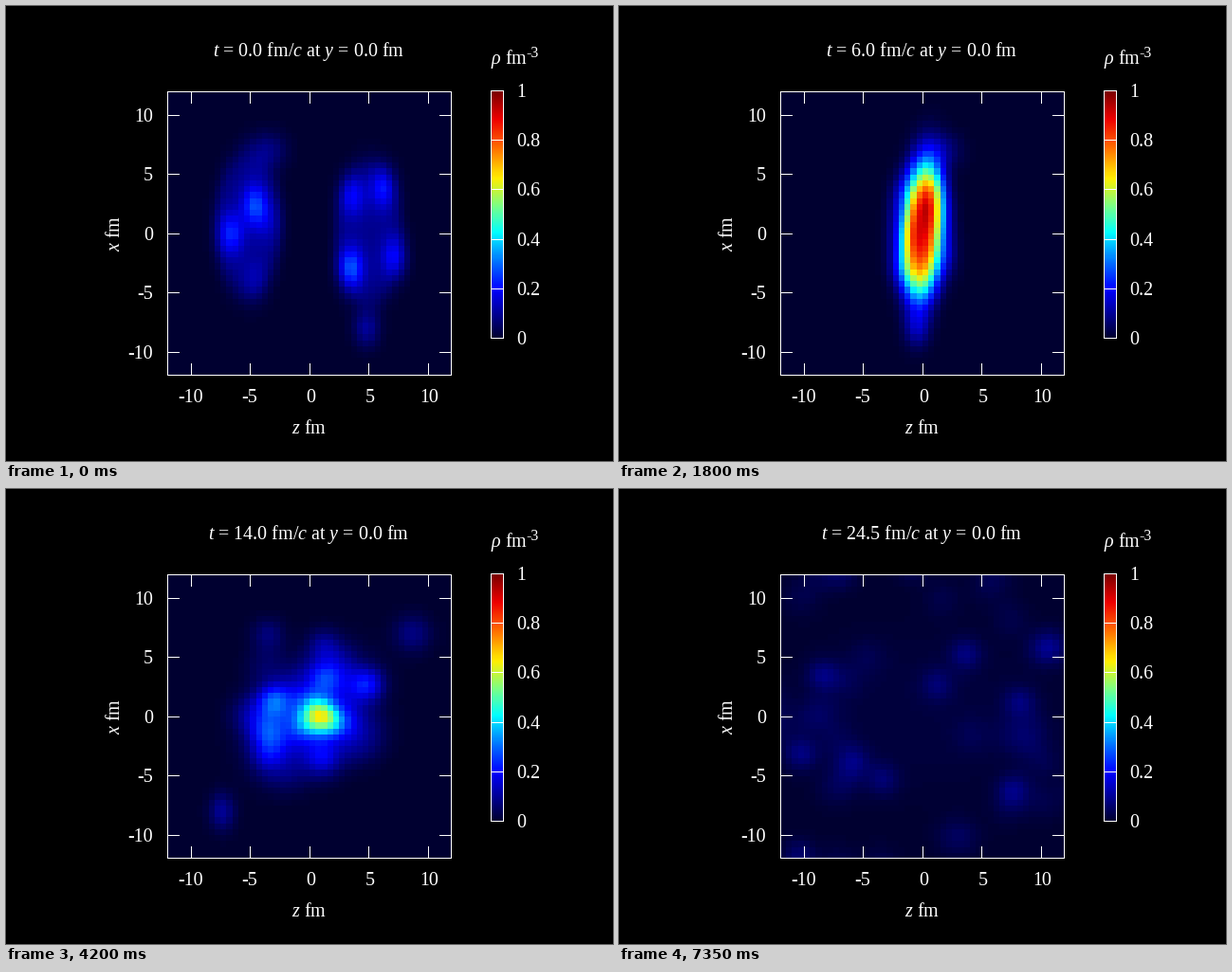
A matplotlib script for the animation above (7500 ms loop, 640 px wide and 480 px high).

```python
import numpy as np
import matplotlib.pyplot as plt
from matplotlib.animation import FuncAnimation
from matplotlib.colors import LinearSegmentedColormap

W, H, DPI = 640, 480, 100
FRAMES, STEP = 50, 150
BETA = 0.87          # speed of the incoming nuclei, in c
BREAKUP = 16.5       # time at which the fragments are listed
PX = 72 / DPI        # one pixel in points

plt.rcParams.update({
    "font.family": "Liberation Serif",
    "mathtext.fontset": "custom",
    "mathtext.rm": "Liberation Serif",
    "mathtext.it": "Liberation Serif:italic",
})

PALETTE = LinearSegmentedColormap.from_list("density", [
    (0, "#000030"), (0.2, "#0000ff"), (0.31, "#0070ff"), (0.43, "#00ffff"),
    (0.54, "#80ff80"), (0.65, "#ffee00"), (0.77, "#ff7000"),
    (0.89, "#ee0000"), (1, "#7f0000")], N=256)

# Dense spots of each nucleus: z, x, peak
LEFT = [(-4.6, 2.4, .18), (-6.6, 0, .15), (-3.5, 1, .05), (-4.6, -4, .05)]
RIGHT = [(3.6, 3.2, .12), (6.2, 3.9, .14), (3.5, -2.9, .2), (7.2, -2, .13)]

# Fragments at breakup: z, x, vz, vx, peak
FRAGMENTS = [
    (2.6, .4, .7, .1, .34), (3.3, -1.8, .55, -.55, .16),
    (1.9, 3.7, .22, .2, .12), (6.3, 3.5, .55, .3, .16),
    (-4.8, .3, -.68, -.43, .16), (-2.3, .3, -.76, .4, .14),
    (-4.2, -2, -.2, -.22, .11), (-5.2, -5.3, -.65, -.8, .09),
    (0, -3.8, -.42, -.19, .09), (-4.3, 8.2, -.32, .5, .07),
    (.7, 7.7, -.2, .65, .08), (.3, 1.5, .12, .15, .08),
]

# Fireball over time
TIMES = (1, 4, 8, 12, 16.5, 24.5)
PEAK = (0, .33, 1.25, .24, .06, .015)
WIDTH_Z = (.8, .9, 1.35, 2.3, 4, 8)
WIDTH_X = (4, 4, 4, 3, 3.5, 5)
TILT = (0, 0, .1, .4, .3, 0)

# Thin gas of light particles, blown out from the centre
rng = np.random.default_rng(4)
angle = rng.uniform(0, 2 * np.pi, 30)
speed = 0.85 * np.sqrt(rng.uniform(0.05, 1, 30))
GAS = np.column_stack([speed * np.cos(angle), speed * np.sin(angle)])

axis = np.arange(-11.75, 12, 0.5)
Z, X = np.meshgrid(axis, axis)


def smooth(u):
    u = np.clip(u, 0, 1)
    return u * u * (3 - 2 * u)


def spot(z, x, peak, sz=0.95, sx=0.95):
    return peak * np.exp(-((Z - z) / sz) ** 2 / 2 - ((X - x) / sx) ** 2 / 2)


def nucleus(z, x, spots, shift):
    """Flattened body with a soft edge and a few dense spots."""
    r = np.hypot((Z - z - shift) / 2.9, (X - x) / 6.3)
    body = 0.09 / (1 + np.exp((r - 0.95) / 0.1))
    return body + sum(spot(a + shift, b, p, 0.75, 1.25) for a, b, p in spots)


def fireball(t):
    peak, sz, sx, tilt = (np.interp(t, TIMES, key)
                          for key in (PEAK, WIDTH_Z, WIDTH_X, TILT))
    x = X - 0.3
    r2 = (((Z - tilt * x) / sz) ** 2 + (x / sx) ** 2) / 2
    return peak * np.exp(-r2 ** 1.3)


def density(t):
    d = BETA * t
    rho = fireball(t)
    rho += (1 - smooth((t - 4) / 4)) * (nucleus(-5.2, .8, LEFT, d)
                                        + nucleus(5, 0, RIGHT, -d))
    # outer edges that miss the collision
    rho += spot(-3.5 + d, 7, .08, 1.1, 1.1) + spot(4.8 - d, -8, .1, .75, 1.1)

    born = smooth((t - 8) / 4)
    dt = t - BREAKUP
    for z, x, vz, vx, peak in FRAGMENTS:
        # denser fragments evaporate faster
        left = born * peak * np.exp(-0.6 * peak * max(dt, 0))
        rho += spot(z + vz * dt, x + vx * dt, left)
    for vz, vx in GAS:
        rho += spot(vz * (t - 7), vx * (t - 7), 0.025 * born, 1.1, 1.1)
    return rho


fig = plt.figure(figsize=(W / DPI, H / DPI), dpi=DPI, facecolor="black")
ax = fig.add_axes([0, 0, 1, 1])
ax.set_axis_off()


def line(xs, ys):
    ax.plot(np.add(xs, 0.5), np.add(ys, 0.5), color="white", lw=PX,
            snap=False, solid_capstyle="projecting", zorder=3)


def box(x0, y0, x1, y1):
    line([x0, x1, x1, x0, x0], [y0, y0, y1, y1, y0])


def label(x, y, s, ha="center", size=20, **kw):
    return ax.text(x, y, s, color="white", ha=ha, va="baseline",
                   fontsize=size * PX, **kw)


field = ax.imshow(density(0), cmap=PALETTE, vmin=0, vmax=1, origin="lower",
                  interpolation="nearest", extent=(170, 470, 390, 90))
ax.imshow(np.linspace(1, 0, 260)[:, None], cmap=PALETTE, vmin=0, vmax=1,
          interpolation="nearest", extent=(511, 525, 351, 90))
ax.set(xlim=(0, W), ylim=(H, 0), aspect="auto")

box(170, 90, 469, 389)
for v in range(-10, 11, 5):
    px, py = int(320 + 12.5 * v), int(240 - 12.5 * v)
    for a, b in ((90, 102), (377, 389)):
        line([px, px], [a, b])
    for a, b in ((170, 182), (457, 469)):
        line([a, b], [py, py])
    label(px + (0 if v < 0 else 1.5), 418, str(v))
    label(155, py + 7, str(v), "right")

box(511, 89, 524, 350)
for i in range(6):
    y = round(350 - 52.2 * i)
    line([511, 524], [y, y])
    label(538.5, y + 7, f"{i / 5:g}", "left")

label(319, 451, "$z$ fm")
label(125, 240, "$x$ fm", "right", rotation=90).set_va("center")
label(511, 61, r"$\rho$ fm", "left")
label(548.5, 54, "-3", "left", 16)
title = label(319, 53, "")


def update(i):
    t = i / 2
    field.set_data(density(t))
    title.set_text(f"$t$ = {t:.1f} fm/$c$ at $y$ = 0.0 fm")
    return field, title


anim = FuncAnimation(fig, update, frames=FRAMES, interval=STEP,
                     repeat=True, repeat_delay=0)
plt.show()
```
